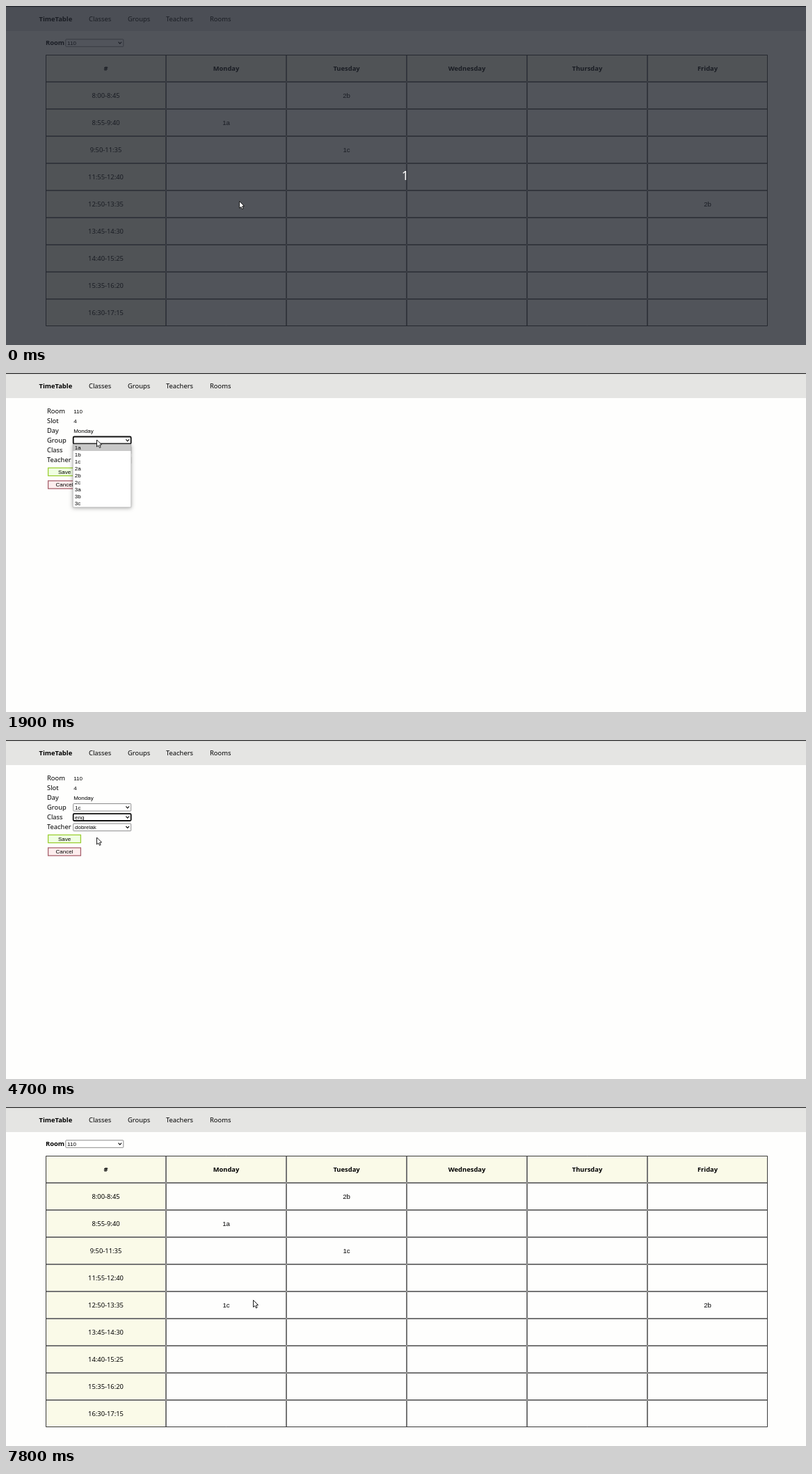
Write an HTML page with a canvas that moves like this. It is 1150x487 px and loops after 8 s.

```html
<!DOCTYPE html>
<html lang="en">
<head>
<meta charset="utf-8">
<title>TimeTable</title>
<style>
html, body { margin: 0; width: 100%; height: 100%; overflow: hidden; background: #fefefd; }
canvas { display: block; }
</style>
</head>
<body>
<canvas id="stage" width="1150" height="487"></canvas>
<script>
const ctx = document.getElementById('stage').getContext('2d');
const LOOP = 8000, STEP = 100;
const UI = '9.4px "Noto Sans", sans-serif';
const BOLD = 'bold ' + UI;
const CELL = '9.6px "Liberation Sans", sans-serif';
const FIELD = '8px "Liberation Sans", sans-serif';

const days = ['#', 'Monday', 'Tuesday', 'Wednesday', 'Thursday', 'Friday'];
const hours = ['8:00-8:45', '8:55-9:40', '9:50-11:35', '11:55-12:40', '12:50-13:35',
  '13:45-14:30', '14:40-15:25', '15:35-16:20', '16:30-17:15'];
const lessons = [[2, 1, '2b'], [1, 2, '1a'], [2, 3, '1c'], [5, 5, '2b']];

// Each field: select position, focus time, and when its list opens and closes
const fields = [
  { label: 'Group', y: 91, focus: 1600, open: 1900, close: 2400, first: -1,
    options: ['1a', '1b', '1c', '2a', '2b', '2c', '3a', '3b', '3c'] },
  { label: 'Class', y: 105.3, focus: 3500, open: 3700, close: 4400, first: 0,
    options: ['mat', 'geo', 'eng', 'bio', 'phys'] },
  { label: 'Teacher', y: 119.6, focus: 5100, open: 5200, close: 6100, first: 0,
    options: ['dobrelak', 'marnecz', 'wenth', 'tolvik', 'pranzel', 'harlop', 'cubrisz'] }
];
const PICKED = 2, ROW = 10;
const SAVE_FOCUS = 6700, FORM_START = 800, FORM_END = 7000;

// Pointer path: time, x, y
const path = [
  [0, 335.5, 280.5], [1100, 335.5, 280.5], [1500, 130.5, 78], [1600, 130.5, 96],
  [2000, 130.5, 96], [2300, 130.5, 126], [2400, 130.5, 128.5], [2500, 130.5, 128.5],
  [2900, 131, 118.5], [3000, 131, 118.5], [3500, 131, 110], [3800, 131, 110],
  [4200, 131, 136.5], [4300, 131, 136.5], [4400, 130.5, 144.5], [4600, 130.5, 144.5],
  [4700, 130.5, 140], [4900, 131, 125], [5300, 131, 125], [5700, 131.5, 161],
  [5800, 131.5, 161], [5900, 131.5, 159.5], [6000, 131.5, 159.5],
  [6500, 87.5, 143.5], [7200, 87.5, 143.5], [7800, 355.5, 277.5], [LOOP, 355.5, 277.5]
];

function pointerAt(t) {
  const i = path.findIndex(p => p[0] > t);
  const [t0, x0, y0] = path[i - 1], [t1, x1, y1] = path[i];
  const k = (t - t0) / (t1 - t0);
  return [x0 + (x1 - x0) * k, y0 + (y1 - y0) * k];
}

function rect(x, y, w, h, color) {
  ctx.fillStyle = color;
  ctx.fillRect(x, y, w, h);
}

function outline(x, y, w, h, color, width, radius = 0) {
  ctx.strokeStyle = color;
  ctx.lineWidth = width;
  ctx.beginPath();
  ctx.roundRect(x, y, w, h, radius);
  ctx.stroke();
}

function text(str, x, y, font, align = 'left', color = '#000') {
  ctx.font = font;
  ctx.textAlign = align;
  ctx.fillStyle = color;
  ctx.fillText(str, x, y);
}

function select(x, y, value, focused, hovered) {
  rect(x, y, 84, 11.5, '#fff');
  if (focused) outline(x + .5, y + .5, 83, 10.2, '#101010', 1.8, 1.5);
  else outline(x + .5, y + .5, 83, 10.5, hovered ? '#4f4f4f' : '#808080', .9, .8);
  text(value, x + 2.8, y + 8.5, FIELD);
  ctx.strokeStyle = '#111';
  ctx.lineWidth = 1.2;
  ctx.beginPath();
  ctx.moveTo(x + 76.2, y + 4.4);
  ctx.lineTo(x + 78.5, y + 6.8);
  ctx.lineTo(x + 80.8, y + 4.4);
  ctx.stroke();
}

function button(y, label, border, fill, focused) {
  rect(60, y, 48, 12.5, fill);
  if (focused) outline(60.7, y + .7, 46.6, 11.1, '#101010', 1.8, 1.5);
  else outline(60.6, y + .6, 46.8, 11.3, border, 1.3);
  text(label, 84, y + 8.9, FIELD, 'center');
}

function header() {
  rect(0, 0, 1150, 487, '#fefefd');
  rect(0, 0, 1150, 36, '#e5e5e3');
  rect(0, 0, 1150, 1.2, '#222');
  text('TimeTable', 47.5, 22.3, BOLD);
  [['Classes', 119], ['Groups', 175], ['Teachers', 230], ['Rooms', 293]]
    .forEach(([name, x]) => text(name, x, 22.3, UI));
}

function timetable(saved) {
  text('Room', 57, 56, BOLD);
  select(85.3, 47.3, '110');
  for (let row = 0; row < 10; row++) {
    for (let col = 0; col < 6; col++) {
      const x = 57 + 173 * col, y = 70 + 39 * row;
      if (!row || !col) rect(x, y, 173, 39, '#fafae8');
      outline(x + .5, y + .5, 172, 38, '#757575', 1);
      const label = !row ? days[col] : !col ? hours[row - 1] : '';
      text(label, x + 86.5, y + 23, row ? UI : BOLD, 'center');
    }
  }
  outline(57.5, 70.5, 1037, 389, '#3c3c3c', 1);
  const shown = saved ? [...lessons, [1, 5, '1c']] : lessons;
  shown.forEach(([col, row, name]) =>
    text(name, 143.5 + 173 * col, 92.6 + 39 * row, CELL, 'center'));
}

function popup(field, t, py) {
  const top = field.y + 11, h = ROW * field.options.length;
  const under = Math.floor((py - top) / ROW);
  const active = under >= 0 ? under : Math.max(field.first, 0);
  ctx.save();
  ctx.shadowColor = 'rgba(0,0,0,.35)';
  ctx.shadowBlur = 6;
  ctx.shadowOffsetY = 1;
  rect(96, top, 84, h + 1, '#fff');
  ctx.restore();
  rect(96, top + active * ROW, 84, ROW, '#c8c8c8');
  outline(96.3, top + .3, 83.4, h + .6, '#a0a0a0', .6);
  field.options.forEach((name, i) => text(name, 98.8, top + i * ROW + 7.8, FIELD));
}

function form(t, [px, py]) {
  [['Room', '110'], ['Slot', '4'], ['Day', 'Monday']].forEach(([name, value], i) => {
    text(name, 59, 57.8 + 13.9 * i, UI);
    text(value, 97.2, 57.8 + 13.9 * i, FIELD);
  });
  const opened = fields.find(f => t >= f.open && t < f.close);
  const focused = t < SAVE_FOCUS && fields.filter(f => t >= f.focus).pop();
  const filled = t >= fields[0].close;
  fields.forEach(f => {
    const index = t >= f.close ? PICKED : filled ? f.first : -1;
    const hovered = !opened && px > 96 && px < 180 && py > f.y && py < f.y + 11.5;
    text(f.label, 59, f.y + 8.8, UI);
    select(96.2, f.y, f.options[index] || '', f === focused, hovered);
  });
  button(135.8, 'Save', '#9acd32', '#f0ffe2', t >= SAVE_FOCUS);
  button(154.3, 'Cancel', '#a8616d', '#fdeeee', false);
  if (opened) popup(opened, t, py);
}

function pointer([x, y]) {
  ctx.save();
  ctx.translate(x, y);
  ctx.beginPath();
  [[0, 0], [0, 10], [2.3, 8], [4, 11.4], [5.6, 10.6], [4.1, 7.3], [7, 7]]
    .forEach(([a, b]) => ctx.lineTo(a, b));
  ctx.closePath();
  ctx.fillStyle = '#fff';
  ctx.fill();
  ctx.strokeStyle = '#1c1c1c';
  ctx.lineWidth = 1;
  ctx.stroke();
  ctx.restore();
}

function draw(now) {
  const t = Math.floor(now % LOOP / STEP) * STEP;
  const pos = pointerAt(t);
  header();
  if (t >= FORM_START && t < FORM_END) form(t, pos);
  else timetable(t >= FORM_END);
  if (t < STEP) {
    rect(0, 0, 1150, 487, 'rgba(33,37,46,.78)');
    text('1', 574, 249.8, '18px "Noto Sans", sans-serif', 'center', '#fff');
  }
  pointer(pos);
}

const start = performance.now();
function tick() {
  draw(performance.now() - start);
  requestAnimationFrame(tick);
}
tick();
</script>
</body>
</html>
```
